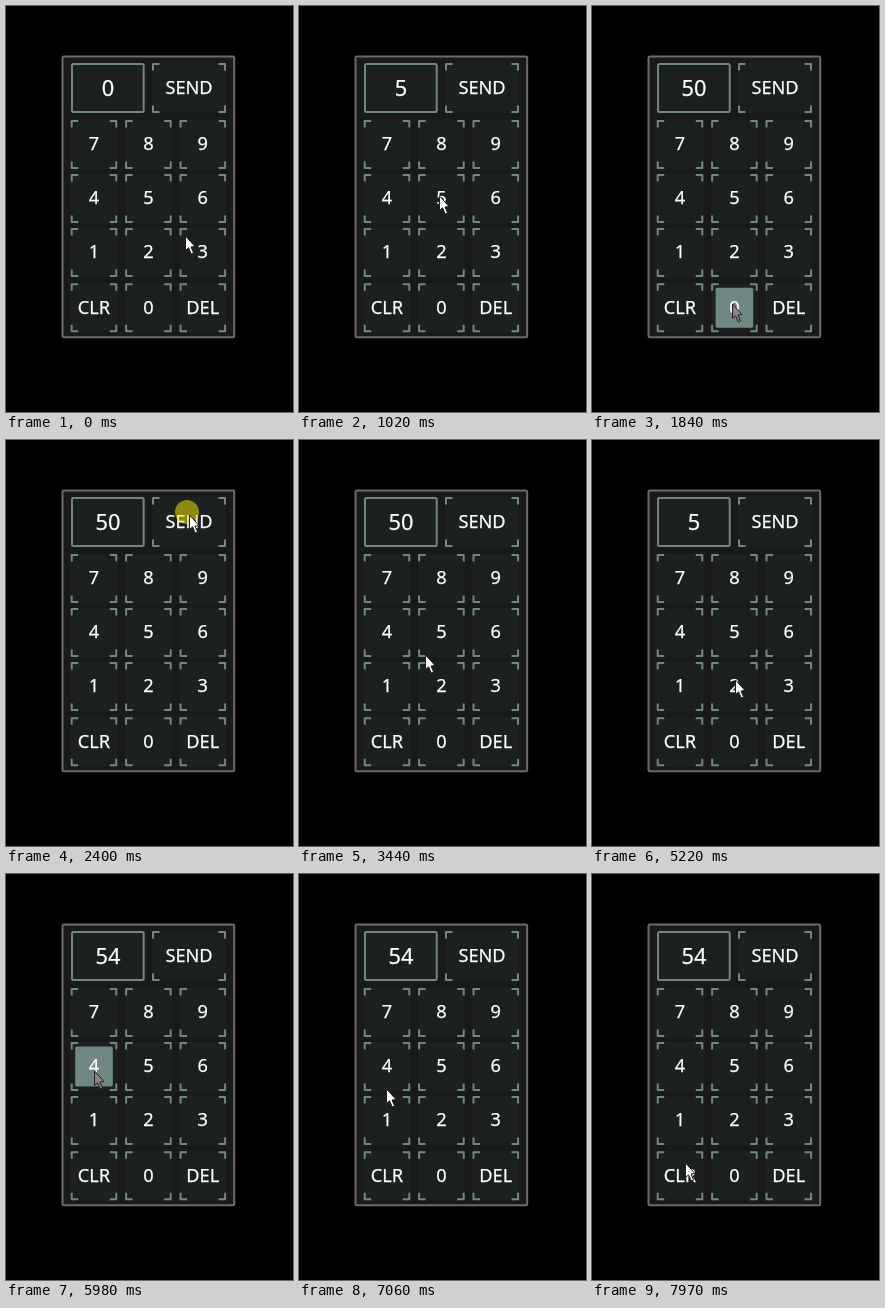
An HTML page with a canvas that plays this animation: 287x406 px, repeating every 8 s.

```html
<!DOCTYPE html>
<html lang="en">
<head>
<meta charset="utf-8">
<title>Keypad</title>
<style>
  html, body { margin: 0; width: 100%; height: 100%; overflow: hidden; background: #000; }
  canvas { display: block; }
</style>
</head>
<body>
<canvas id="stage" width="287" height="406"></canvas>
<script>
const ctx = document.getElementById('stage').getContext('2d');
const LOOP = 8000, FLASH = 70;
const FONT = '"Noto Sans", "Open Sans", sans-serif';
const LINE = '#6f8883', FACE = '#1c2020';

const rows = [114, 168, 222, 277.3];
const labels = ['7', '8', '9', '4', '5', '6', '1', '2', '3', 'CLR', '0', 'DEL'];
const buttons = labels.map((label, i) => ({
  label, x: 64.7 + 54.4 * (i % 3), y: rows[Math.floor(i / 3)], w: 46.6, h: 49
}));
buttons.push({ label: 'SEND', x: 146, y: 57, w: 74, h: 50 });

// The pointer glides to x, y between start and end; a press lasts from down to up
const start = { x: 179, y: 229 };
const moves = [
  { start: 0, end: 280, x: 140, y: 189, press: '5', down: 880, up: 950 },
  { start: 1020, end: 1640, x: 140, y: 297, press: '0', down: 1710, up: 1780 },
  { start: 1910, end: 2400, x: 183, y: 74, press: 'SEND', down: 2400, up: 2470 },
  { start: 2750, end: 3650, x: 117, y: 236 },
  { start: 3650, end: 4330, x: 190, y: 303, press: 'DEL', down: 4400, up: 4600 },
  { start: 4800, end: 5260, x: 142, y: 238 },
  { start: 5260, end: 5710, x: 88, y: 196, press: '4', down: 5910, up: 5980 },
  { start: 6200, end: 6590, x: 85, y: 217 },
  { start: 7030, end: 7400, x: 180, y: 78, press: 'SEND', down: 7400, up: 7470 },
  { start: 7540, end: 8050, x: 87, y: 302 }
];
const presses = moves.filter(m => m.press);

const smooth = u => u * u * (3 - 2 * u);

function pointerAt(t) {
  let { x, y } = start;
  for (const m of moves) {
    const k = smooth(Math.min(1, Math.max(0, (t - m.start) / (m.end - m.start))));
    x += (m.x - x) * k;
    y += (m.y - y) * k;
  }
  return [Math.round(x), Math.round(y)];
}

function valueAt(t) {
  let value = '';
  for (const { press, up } of presses) {
    if (t < up) break;
    if (press === 'DEL') value = value.slice(0, -1);
    else if (press !== 'SEND') value += press;
  }
  return value || '0';
}

function box(x, y, w, h, fill, stroke) {
  ctx.beginPath();
  ctx.roundRect(x, y, w, h, 1.5);
  ctx.fillStyle = fill;
  ctx.fill();
  if (!stroke) return;
  ctx.lineWidth = 2;
  ctx.strokeStyle = stroke;
  ctx.stroke();
}

function text(str, x, baseline, size) {
  ctx.font = `${size}px ${FONT}`;
  ctx.textAlign = 'center';
  ctx.fillStyle = ctx.strokeStyle = '#fff';
  ctx.lineWidth = 0.25;
  ctx.fillText(str, x, baseline);
  ctx.strokeText(str, x, baseline);
}

function drawButton({ label, x, y, w, h }, lit) {
  box(x, y, w, h, FACE);
  ctx.beginPath();
  for (const [cx, dx] of [[x + 1, 6.5], [x + w - 1, -6.5]]) {
    for (const [cy, dy] of [[y + 1, 6.5], [y + h - 1, -6.5]]) {
      ctx.moveTo(cx + dx, cy);
      ctx.lineTo(cx, cy);
      ctx.lineTo(cx, cy + dy);
    }
  }
  ctx.lineWidth = 2;
  ctx.lineJoin = 'round';
  ctx.strokeStyle = LINE;
  ctx.stroke();
  if (lit) box(x + 4.5, y + 4.5, w - 9, h - 9, LINE);
  text(label, x + w / 2, Math.floor(y + h / 2 + 6.25), 18.2);
}

function drawPointer(x, y, fill) {
  ctx.save();
  ctx.translate(x, y);
  ctx.beginPath();
  ctx.moveTo(0.5, 1);
  for (const [px, py] of [[0.5, 15.5], [3.6, 12.8], [6.2, 19], [8.6, 18], [6, 12], [10, 11.5]]) {
    ctx.lineTo(px, py);
  }
  ctx.closePath();
  ctx.fillStyle = fill;
  ctx.fill();
  ctx.lineWidth = 1;
  ctx.strokeStyle = '#221e1f';
  ctx.stroke();
  ctx.restore();
}

function draw(t) {
  const lit = presses.find(p => t >= p.up && t < p.up + FLASH);
  const held = presses.some(p => t >= p.down && t < p.up);
  const [x, y] = pointerAt(t);

  ctx.fillStyle = '#000';
  ctx.fillRect(0, 0, 287, 406);
  box(56.5, 50.5, 171.7, 280.7, '#1a1a1b', '#6b6b69');
  box(66, 58, 71.7, 48, FACE, LINE);
  text(valueAt(t), 102, 90, 21.8);
  for (const b of buttons) drawButton(b, lit && lit.press === b.label);

  if (held) {
    ctx.beginPath();
    ctx.arc(x - 2, y - 2, 12, 0, Math.PI * 2);
    ctx.fillStyle = 'rgba(240, 230, 0, 0.53)';
    ctx.fill();
  }
  drawPointer(x, y, lit ? '#8c8484' : '#fff');
}

function tick() {
  draw(performance.now() % LOOP);
  requestAnimationFrame(tick);
}
tick();
</script>
</body>
</html>
```
